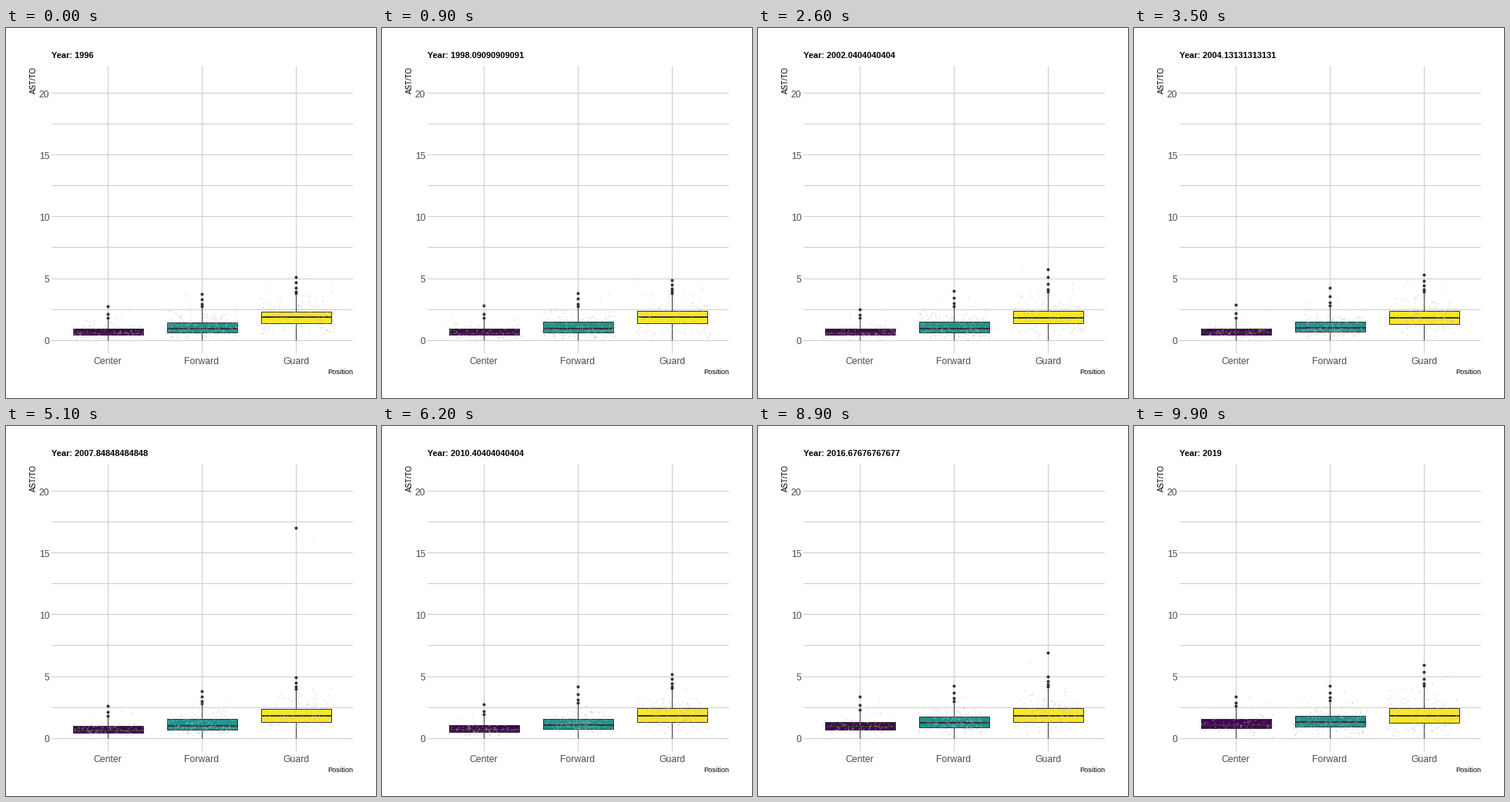
Write a matplotlib script that moves like this. It is 480 px wide and 480 px high and loops after 10000 ms.

```python
import matplotlib.pyplot as plt
import numpy as np
from matplotlib.animation import FuncAnimation
from matplotlib.patches import Rectangle

FRAMES, FIRST, SPAN = 100, 1996, 23
UNIT, ZERO = 16.07, 405.5          # pixels per unit, y of value 0
LEFT, RIGHT, TOP, BOTTOM = 59, 450, 50, 422
DARK, GRID, GREY = "#333333", "#cccccc", "#4d4d4d"

# quartiles drift from start to end, following (time ** power)
GROUPS = [
    dict(name="Center", fill="#440154", start=(.43, .62, .95),
         end=(.83, 1.1, 1.53), power=4, count=100, reach=1.0, extra=3),
    dict(name="Forward", fill="#21908C", start=(.62, .96, 1.46),
         end=(.93, 1.33, 1.78), power=2, count=200, reach=1.4, extra=4),
    dict(name="Guard", fill="#FDE725", start=(1.37, 1.87, 2.33),
         end=(1.27, 1.85, 2.45), power=1, count=190, reach=1.6, extra=5),
]
# single seasons that stand out
SPIKES = {("Forward", 2000): 7.05, ("Guard", 2000): 6.85,
          ("Guard", 2008): 20, ("Forward", 2013): 5, ("Guard", 2017): 7.2}

rng = np.random.default_rng(7)
knots = np.rint(np.arange(SPAN + 1) * (FRAMES - 1) / SPAN).astype(int)


def to_y(v):
    return ZERO - UNIT * np.asarray(v)


def tween(a, b, t):
    return a + (b - a) * t


def season(group, cx, year):
    """Box values, outliers and jittered dots of one group in one year."""
    u = ((year - FIRST) / SPAN) ** group["power"]
    q1, mid, q3 = tween(np.array(group["start"]), np.array(group["end"]), u)
    high = q3 + 1.42 * (q3 - q1)
    box = np.array([0, q1, mid, q3, high])

    top = group["reach"] * rng.uniform(.6, 1.2)
    out = high + .12 + top * np.linspace(1, 0, group["extra"]) ** 1.5
    out[0] = SPIKES.get((group["name"], year), out[0])

    n = group["count"]
    vals = np.interp(rng.random(n), (0, .03, .25, .5, .75, .93, 1),
                     (0, q1 * .4, q1, mid, q3, tween(q3, high, .5), high))
    vals[:len(out)] = out
    rng.shuffle(vals)
    dots = np.column_stack([cx + rng.uniform(-49, 49, n), to_y(vals)])
    return box, out, dots


plt.rcParams["font.family"] = "Liberation Sans"
fig = plt.figure(figsize=(480 / 72, 480 / 72), dpi=72, facecolor="white")
ax = fig.add_axes([0, 0, 1, 1])
ax.set(xlim=(0, 480), ylim=(480, 0))
ax.axis("off")


def line(xs, ys, color, width=1, z=1):
    return ax.plot(xs, ys, color=color, lw=width, zorder=z, snap=False,
                   solid_capstyle="butt")[0]


def label(x, y, text, size, color="black", **kw):
    return ax.text(x, y, text, size=size, color=color, **kw)


for v in np.arange(0, 21, 2.5):
    y = np.floor(to_y(v)) + .5
    line((LEFT, RIGHT), (y, y), GRID)
    if v % 5 == 0:
        label(56.5, y + 5, f"{v:.0f}", 12.3, GREY, ha="right")
label(RIGHT, 449, "Position", 9.3, ha="right")
label(40.5, TOP, "AST/TO", 9.8, rotation=90, ha="right", va="top")
title = label(LEFT, 39, "", 11, weight="bold")


class BoxPlot:
    def __init__(self, group, cx):
        line((cx, cx), (TOP, BOTTOM), GRID)
        label(cx - .5, 436, group["name"], 12.3, GREY, ha="center")
        left, right = cx - 45, cx + 46
        self.cx = cx
        self.lower = line((cx, cx), (0, 0), DARK, z=2)
        self.upper = line((cx, cx), (0, 0), DARK, z=2)
        self.box = ax.add_patch(Rectangle((left, 0), right - left, 1, lw=1, ec=DARK,
                                          fc=group["fill"], snap=False, zorder=3))
        self.median = line((left, right), (0, 0), DARK, 2, 4)
        self.spots = ax.scatter([], [], s=16, c=DARK, lw=0, zorder=5)
        self.dots = ax.scatter([], [], s=3.6, c="#bebebe", alpha=.42, lw=0, zorder=6)
        self.years = [season(group, cx, FIRST + k) for k in range(SPAN + 1)]

    def update(self, k, t):
        box, out, dots = (tween(a, b, t) for a, b in zip(self.years[k], self.years[k + 1]))
        low, q1, _, q3, high = np.floor(to_y(box)) + .5
        mid = np.rint(to_y(box[2]))
        self.lower.set_ydata((low, q1))
        self.upper.set_ydata((q3, high))
        self.box.set_y(q3)
        self.box.set_height(q1 - q3)
        self.median.set_ydata((mid, mid))
        self.spots.set_offsets([(self.cx - .3, y) for y in to_y(out)])
        self.dots.set_offsets(dots)


plots = [BoxPlot(g, 132.5 + 122 * i) for i, g in enumerate(GROUPS)]


def draw(i):
    title.set_text(f"Year: {FIRST + i * SPAN / (FRAMES - 1):.15g}")
    k = min(np.searchsorted(knots, i, side="right") - 1, SPAN - 1)
    t = (i - knots[k]) / (knots[k + 1] - knots[k])
    for plot in plots:
        plot.update(k, t)
    return []


anim = FuncAnimation(fig, draw, frames=FRAMES, interval=100, repeat=True,
                     repeat_delay=0, init_func=lambda: draw(0))
plt.show()
```
